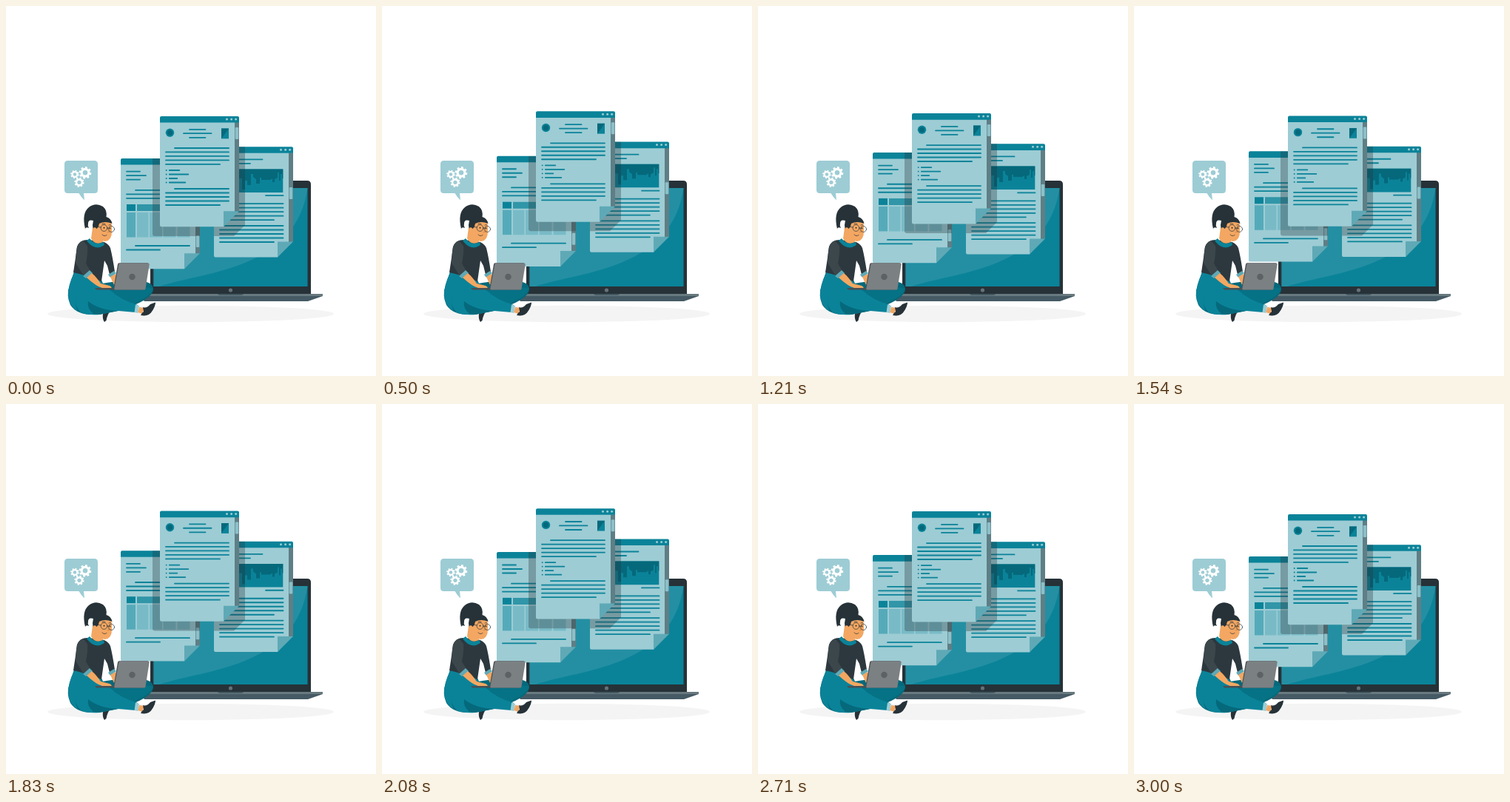
An HTML page for the animation above (3.04 s loop, 500 by 500 pixels).

```html
<!DOCTYPE html>
<html lang="en">
<head>
<meta charset="utf-8">
<title>Floating documents</title>
<style>
  html, body { margin: 0; width: 100%; height: 100%; overflow: hidden; background: #fff; }
  svg { display: block; width: 100vw; height: 100vh; }
  .teal { fill: #0a8399; }
  .deep { fill: #05697b; }
  .pale { fill: #9dccd4; }
  .mid { fill: #5fa9b6; }
  .ink { fill: #263238; }
  .skin { fill: #f3a762; }
  .rule { fill: none; stroke: #0a8399; stroke-width: 1.8; stroke-linecap: round; }
  .shade { fill: #263238; opacity: .32; }
  .gear { fill: none; stroke: #fff; }
  .thin { fill: none; stroke: #263238; stroke-width: .7; stroke-linecap: round; }
</style>
</head>
<body>
<svg viewBox="0 0 500 500">
  <defs>
    <path id="outline" d="M0 2q0-2 2-2H105q2 0 2 2V128.3L86 149.3H2q-2 0-2-2Z"/>
    <clipPath id="clipLeft"><use href="#outline" x="155" y="206"/></clipPath>
    <clipPath id="clipRight"><use href="#outline" x="281" y="190.2"/></clipPath>
    <path id="shadow" d="M198 140H323V296L308 311H201q-3 0-3-3Z"/>
    <g id="page">
      <path class="pale" d="M0 8H101V128.3L86 149.3H2q-2 0-2-2Z"/>
      <path fill="#5f7e85" d="M101 8h6V128.3h-6Z"/>
      <path class="teal" d="M0 8.6V2q0-2 2-2H105q2 0 2 2V8.6Z"/>
      <g class="pale"><circle cx="90.5" cy="4" r="1.5"/><circle cx="96.6" cy="4" r="1.5"/><circle cx="102.6" cy="4" r="1.5"/></g>
      <path class="mid" d="M86 128.3H107L86 149.3Z"/>
    </g>
    <rect id="thumb" width="4.6" height="16" rx="1" fill="#8cc0c9"/>
    <g id="gear" class="gear">
      <circle r="4.9" stroke-width="3.2"/>
      <circle r="7.1" stroke-width="2.4" pathLength="16" stroke-dasharray="1"/>
    </g>
  </defs>

  <ellipse cx="249.500" cy="416" rx="193.500" ry="11.200" fill="#f4f4f4"/>

  <!-- big laptop -->
  <path class="ink" d="M195 389V241q0-5 5-5H407q5 0 5 5V389Z"/>
  <path class="teal" d="M199.500 246H407.500V379H199.500Z"/>
  <path fill="#248fa3" d="M199.500 246H407.500C400 296 372 327 323 347C280 364 245 367 207 379H199.500Z"/>
  <circle cx="303.500" cy="384" r="2.600" fill="#667177"/>
  <path fill="#455a64" d="M179 389H428V392L408 399H187Z"/>
  <path fill="#68797f" d="M179 389H428V392H179Z"/>
  <path fill="#455a64" d="M286 389H321q-1 2-3 2H289q-2 0-3-2Z"/>

  <g id="left">
    <use href="#page" x="155" y="206"/>
    <use href="#thumb" x="256.700" y="310"/>
    <path class="rule" d="M163 223.600h18M163 229.100h26M163 234.600h18M175 248.800h73M163 254.300h85M163 259.800h85M175 324h73M163 329.500h45"/>
    <path class="teal" d="M163 268h12v9h-12Z"/>
    <path fill="#3096a8" d="M177 268h72v9h-72Z"/>
    <path fill="#55aab9" d="M163 279h12v33.500h-12Z"/>
    <path fill="#78bbc7" d="M177 279h15.500v33.500h-15.500ZM194 279h17v33.500h-17ZM212.500 279h17v33.500h-17ZM231.500 279h17v33.500h-17Z"/>
    <g clip-path="url(#clipLeft)"><use id="cast" class="shade" href="#shadow"/></g>
  </g>

  <g id="right">
    <use href="#page" x="281" y="190.200"/>
    <use href="#thumb" x="382.700" y="245"/>
    <path class="rule" d="M289 207.300h57.500M289 212.800h41M351 256.200h23.500"/>
    <path class="rule" d="M289 267.200h85.500M289 272.700h85.500M289 278.200h85.500M289 283.700h85.500M289 289.200h73M289 297h85.500M289 302.500h85.500M289 308h85.500M289 313.500h85.500M289 319h73"/>
    <path class="teal" d="M288 220.400h86.300V252H288Z"/>
    <path class="deep" d="M288 220.400h86.300V233H373V227H371V236H369V225H367V232L363 234V238H360V233L357 235H345V232H343V240H338V234L334 231V227H331V242H326V236H323V248H319V233H312V244H306V235H298V241H288Z"/>
    <g clip-path="url(#clipRight)"><use class="shade" href="#shadow"/></g>
  </g>

  <g id="front">
    <use href="#page" x="208" y="149"/>
    <use href="#thumb" x="309.700" y="164"/>
    <circle class="teal" cx="221.500" cy="171.200" r="5.700"/>
    <circle class="deep" cx="221.500" cy="171.200" r="3.700"/>
    <path class="teal" d="M291 165.500h10V179.300h-10Z"/>
    <path class="deep" d="M291 165.500h10L291 179.300Z"/>
    <path class="rule" d="M248 166.800h21.500M240 172.200h37.500M248 177.800h21.500"/>
    <path class="rule" d="M228 192h73M216 197.400h85M216 202.900h85M216 208.400h85M216 213.900h73M228 247h73M216 252.500h85M216 258h85M216 263.500h85M216 269h73"/>
    <path class="rule" d="M216.600 222h.2M220.800 222h13.500M216.600 227.500h.2M220.800 227.500h25.500M216.600 233h.2M220.800 233h10.500M216.600 238.500h.2M220.800 238.500h21.500"/>
  </g>

  <!-- speech bubble -->
  <path class="pale" d="M83.500 209H119.500q4.500 0 4.500 4.500V248.500q0 4.500-4.500 4.500H105L106 262.500Q102 259 98.500 253H83.500q-4.500 0-4.500-4.500V213.500q0-4.500 4.500-4.500Z"/>
  <use href="#gear" transform="translate(107 225.300)"/>
  <use href="#gear" transform="translate(93 227.500) scale(.7)"/>
  <use href="#gear" transform="translate(99 238.300) scale(.8)"/>

  <!-- legs -->
  <path class="deep" d="M125 376Q160 369 190 373Q200 376 199 384Q196 396 168 406L140 412L110 400Z"/>
  <path class="skin" d="M142 408L152 409L145 412L140 413Z"/>
  <path class="ink" d="M130 406Q137 409 143 406L142 411Q137 416 135.500 425L133 427Q130 423 131 416Z"/>
  <path class="deep" d="M92 359L127 366L132 377L150 398L120 417Q96 418 87 404Q81 391 86 377Z"/>
  <path class="teal" d="M92 361L104 360L128 372L132 377Q105 378 97 389Q91 398 97 413Q85 405 84 391Q84 376 92 361Z"/>
  <path class="teal" d="M132 376Q103 377 96 390Q90 403 101 414Q109 418 126 417L152 412L175 414L178 404Q154 397 141 384Z"/>
  <path class="deep" d="M111 399Q109 408 118 416L126 417L151 412Q126 411 111 399Z"/>
  <path class="teal" d="M141 384Q164 379 199 381Q197 391 178 399L173 404Q153 399 141 384Z" opacity=".35"/>
  <path class="pale" d="M175 403.500L180 405L178.500 415L173.500 414Z"/>
  <path class="skin" d="M180 407L187 408L184 416L178.500 414Z"/>
  <path class="ink" d="M185 407Q190 409 195 403L202 400.500Q202 406 197 413Q193 420 182 418Q183 415 186 413Z"/>

  <!-- torso and arms -->
  <path fill="#2c383e" d="M110 316Q100 316 96 325Q94 341 91 360Q109 364 129 372L133 344L137 351L140 363L147 359Q144 339 141 327Q138 320 129 318Z"/>
  <path fill="#3c474c" d="M104 317Q96 319 95 332L94 347L105 365L114 358L108 348Q111 333 110 324Z"/>
  <path class="teal" d="M109 317L113 314Q120 324 132 319L133 323Q120 332 109 317Z"/>
  <path class="mid" d="M104 365L113 357L117 361L108 368ZM138 363L146 358L149 361L141 367Z"/>
  <path class="skin" d="M109 367L116 361Q122 366 128 375L140 378Q144 380 142 382L130 381Q122 379 109 367ZM141 366L148 362L151 372L146 377Z"/>

  <!-- head -->
  <path class="skin" d="M117 300L115 314Q120 324 131 319L130 312Z"/>
  <path class="skin" d="M119 291Q129 284 140 288Q144 294 143 305Q143 317 134 318Q124 317 119 308Z"/>
  <path class="ink" d="M107 301Q102 280 112 272Q121 265 131 271Q137 276 135.500 285Q142 287 143.500 294Q134 290 126 294Q125 300 121 302L118 306L117 296L118 290Q111 288 111 294Q110 297 112 300Q108 298 107 301Z"/>
  <ellipse class="skin" cx="119.800" cy="303" rx="2.800" ry="3.700"/>
  <g class="thin">
    <circle cx="132.500" cy="300" r="4.400"/>
    <circle cx="142.500" cy="301.500" r="4"/>
    <path d="M136.800 300l2 .4M128 299L121 298M130 294.500q2-1 4 0M139 296q2-1 3 0M130 309q3 3 6 .5"/>
    <path d="M137.500 301l2 4.500-2.500.3" stroke="#c77a3c"/>
  </g>
  <circle class="ink" cx="132.500" cy="299.700" r="1"/>
  <circle class="ink" cx="140.500" cy="300.500" r=".9"/>

  <!-- small laptop -->
  <path fill="#4a5054" d="M120 381H147L149 383.500H122Z"/>
  <path fill="#4a5054" d="M151 349Q151.300 347.300 153 347.300H192L187 383.500H145Z"/>
  <path fill="#7b8083" d="M152.500 349Q152.800 347.500 154.500 347.500H192Q194 347.500 193.700 349L188.500 382Q188.200 383.500 186.500 383.500H148Q146 383.500 146.300 382Z"/>
  <circle cx="170.500" cy="366" r="4.300" fill="#5d6265"/>
</svg>
<script>
  const LOOP = 3040, STEP = 1000 / 24, RISE = 10;
  const $ = id => document.getElementById(id);
  const shift = (id, y) => $(id).setAttribute('transform', `translate(0 ${y})`);

  // Linear up and down within one period
  const float = (t, period) => {
    const p = (t % period) / period;
    return -RISE * (1 - Math.abs(1 - 2 * p));
  };

  const start = performance.now();
  function draw(now) {
    const t = Math.max(0, now - start) % LOOP;
    // The motion is held at 24 steps per second
    const held = Math.min(72, Math.floor((t + 5) / STEP)) * STEP;
    const slow = float(held, 3000), fast = float(held, 1500);
    shift('left', slow);
    shift('right', fast);
    shift('front', fast);
    shift('cast', fast - slow);
    requestAnimationFrame(draw);
  }
  draw(start);
</script>
</body>
</html>
```
